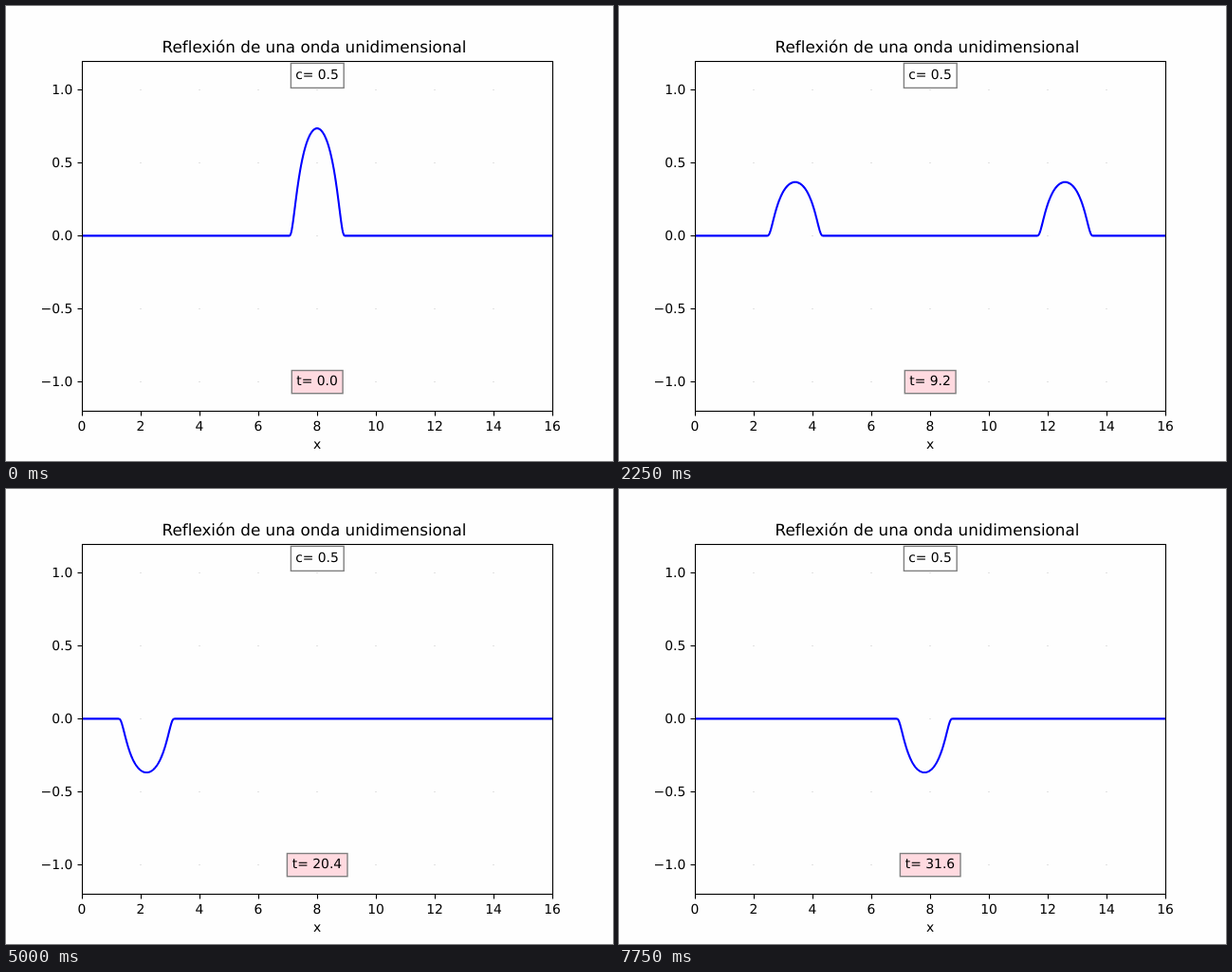
An HTML page for the animation above (8 s loop, 640 by 480 pixels).

```html
<!DOCTYPE html>
<html lang="es">
<head>
<meta charset="utf-8">
<title>Reflexión de una onda unidimensional</title>
<style>
  html, body { margin: 0; width: 100%; height: 100%; overflow: hidden; background: #fefefe; }
  svg { display: block; width: 640px; height: 480px; }
  text { font: 13.89px "DejaVu Sans", sans-serif; text-anchor: middle; text-rendering: geometricPrecision; }
  .title { font-size: 16.8px; }
  .end { text-anchor: end; }
  .axis { fill: none; stroke: #000; stroke-width: 1.11; }
  .box { stroke: #7f7f7f; stroke-width: 1.39; }
  #wave { fill: none; stroke: #00f; stroke-width: 2.08; stroke-linejoin: round; }
</style>
</head>
<body>
<svg viewBox="0 0 640 480">
  <clipPath id="area"><rect x="80" y="57.6" width="496" height="369.6"/></clipPath>
  <g id="grid" fill="#e2e2e2"></g>
  <path id="wave" clip-path="url(#area)"/>
  <rect class="axis" x="80.5" y="58.5" width="496" height="369"/>
  <g id="ticks"></g>
  <text class="title" x="325" y="49">Reflexión de una onda unidimensional</text>
  <text x="328" y="467">x</text>
  <rect class="box" x="300.4" y="60.4" width="55.8" height="26" fill="#fefefe"/>
  <text x="328" y="77">c= 0.5</text>
  <rect class="box" id="clockBox" y="384.5" height="24.2" fill="#ffdae0"/>
  <text id="clock" x="328" y="400"></text>
</svg>
<script>
  const FRAME = 250, COUNT = 32, DT = 1.02, SPEED = 0.5;
  const $ = id => document.getElementById(id);
  const px = x => 80 + 31 * x;
  const py = y => 242.4 - 154 * y;

  function add(parent, name, attrs, text = '') {
    const el = document.createElementNS('http://www.w3.org/2000/svg', name);
    for (const key in attrs) el.setAttribute(key, attrs[key]);
    el.textContent = text;
    parent.append(el);
  }

  const levels = [-1, -0.5, 0, 0.5, 1];
  for (let x = 0; x <= 16; x += 2) {
    add($('ticks'), 'path', { class: 'axis', d: `M${px(x) + 0.5} 428v4.5` });
    add($('ticks'), 'text', { x: px(x), y: 448 }, x);
    if (x % 16) for (const y of levels)
      add($('grid'), 'rect', { x: px(x) - 1, y: Math.floor(py(y)), width: 2, height: 1 });
  }
  for (const y of levels) {
    const row = Math.floor(py(y));
    add($('ticks'), 'path', { class: 'axis', d: `M80 ${row + 0.5}h-4.5` });
    add($('ticks'), 'text', { class: 'end', x: 70.3, y: row + 5.4 }, y.toFixed(1).replace('-', '\u2212'));
  }

  const bump = s => Math.abs(s) < 1 ? Math.exp(-1 / (1 - s * s)) : 0;

  // Fixed left end inverts the pulse; the right end lets it out.
  const height = (x, shift) =>
    bump(x - 8 + shift) + bump(x - 8 - shift) - bump(x + 8 - shift);

  let shown = -1;
  function draw() {
    const step = Math.floor(performance.now() / FRAME) % COUNT;
    if (step !== shown) {
      shown = step;
      const t = step * DT;
      const points = [];
      for (let i = 0; i <= 800; i++) {
        const x = i / 50;
        points.push(px(x).toFixed(2) + ' ' + py(height(x, SPEED * t)).toFixed(2));
      }
      $('wave').setAttribute('d', 'M' + points.join('L'));
      const label = 't= ' + t.toFixed(1);
      const width = label.length > 6 ? 63.6 : 53.8;
      $('clock').textContent = label;
      $('clockBox').setAttribute('x', 328.2 - width / 2);
      $('clockBox').setAttribute('width', width);
    }
    requestAnimationFrame(draw);
  }
  draw();
</script>
</body>
</html>
```
